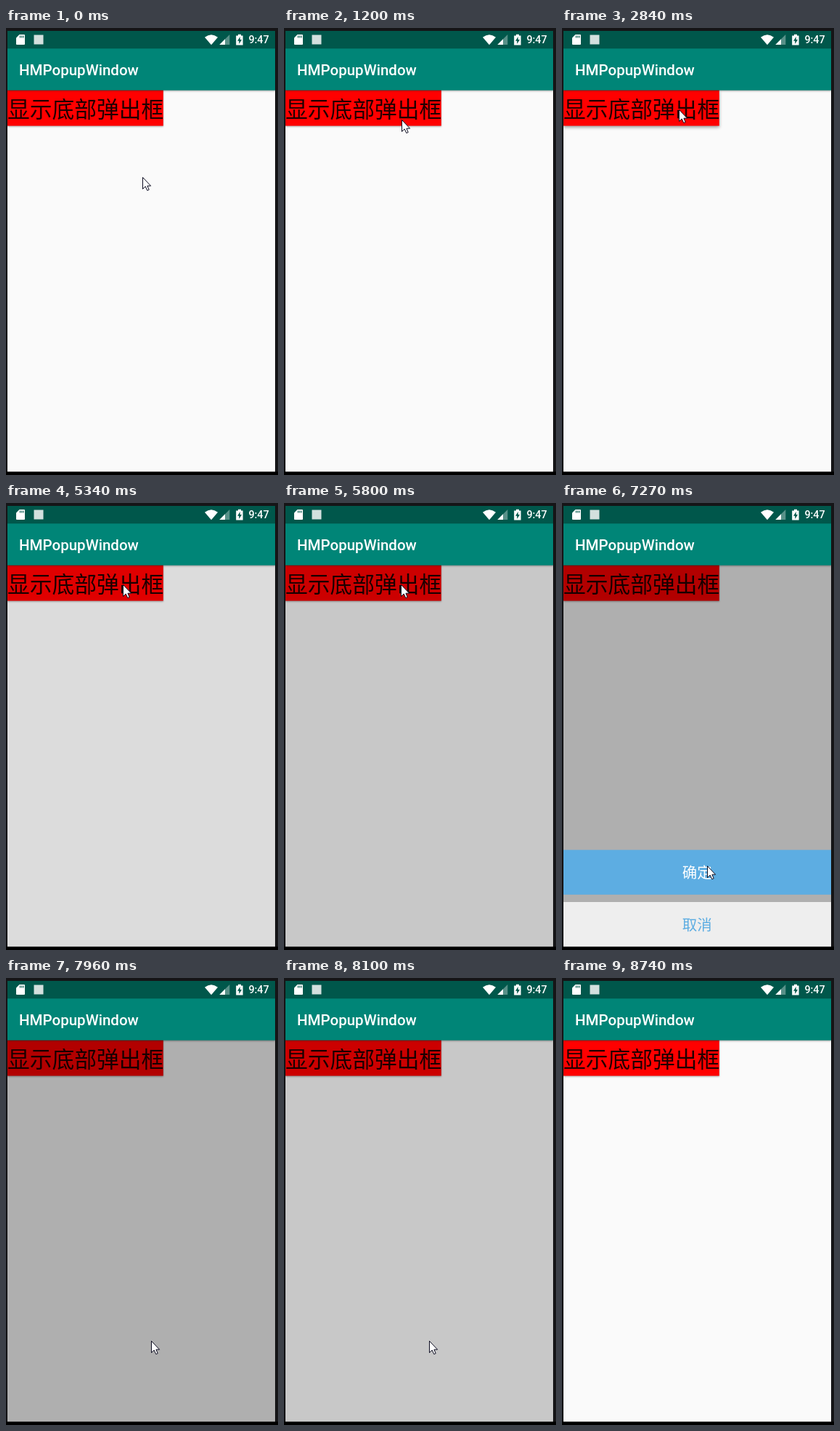
An HTML page for the animation above (9.32 s loop, 375x615 px).

```html
<!DOCTYPE html>
<html lang="zh-CN">
<head>
<meta charset="utf-8">
<title>Popup window</title>
<style>
html, body { margin: 0; width: 100%; height: 100%; overflow: hidden; background: #151517; }
svg { display: block; }
text { font-family: "Noto Sans CJK SC", "Noto Sans CJK", sans-serif; }
.ui { font-family: Roboto, sans-serif; font-weight: 500; fill: #fff; }
.bar { filter: drop-shadow(0 1px 1.2px rgba(0,0,0,.35)); }
.button { filter: drop-shadow(0 1px 1px rgba(0,0,0,.35)); }
.button.lifted { filter: drop-shadow(0 2.5px 2px rgba(0,0,0,.4)); }
.option { font-size: 20.5px; text-anchor: middle; }
</style>
</head>
<body>
<svg width="375" height="615" viewBox="0 0 375 615">
  <rect width="375" height="615" fill="#151517"/>
  <clipPath id="screen"><rect x="2" y="4" width="369" height="607"/></clipPath>
  <g clip-path="url(#screen)">
    <rect x="2" y="85" width="369" height="526" fill="#fafafa"/>
    <rect id="button" class="button" x="2" y="85" width="214.8" height="49.6" fill="#f00"/>
    <text x="2" y="122.7" font-size="30.75" fill="#000" fill-opacity=".87">显示底部弹出框</text>
    <rect id="dim" x="2" y="85" width="369" height="526"/>
    <rect class="bar" x="2" y="28" width="369" height="57.7" fill="#008577"/>
    <rect x="2" y="4" width="369" height="24.3" fill="#00574b"/>
    <g id="popup">
      <rect x="2" y="477.3" width="369" height="61.5" fill="#5dade2"/>
      <rect x="2" y="549" width="369" height="62" fill="#eee"/>
      <text class="option" x="186.3" y="516" fill="#fff">确定</text>
      <text class="option" x="186.3" y="587.7" fill="#5dade2">取消</text>
    </g>
  </g>
  <rect y="610.4" width="375" height="4.6" fill="#000"/>

  <text class="ui" x="18" y="65.3" font-size="20.5">HMPopupWindow</text>
  <text class="ui" x="334.4" y="21.3" font-size="14.35">9:47</text>
  <g fill="#fff">
    <path d="M18.5 9H25q1 0 1 1V22q0 1-1 1H15q-1 0-1-1V13.5Z"/>
    <path d="M19.5 10.5v3m2.2-3v3m2.2-3v3" stroke="#00574b" stroke-width="1.1"/>
    <rect x="38.5" y="9.5" width="13" height="13" fill="#d3e0de"/>
    <path d="M274 12.8Q283 5.8 292 12.8L283 23.3Z"/>
    <path d="M308.3 9V23H294.3Z" fill-opacity=".35"/>
    <path d="M302 15.3V23H294.3Z"/>
    <path d="M320 8.8h4v1.6h2.6V23.6h-9.4V10.4H320Z"/>
    <path d="M322.7 12v4h2.3l-3.7 6v-4.2h-2.2Z" fill="#00574b"/>
  </g>
  <path id="cursor" d="M.5 .5V16.5L4.2 13L6.8 18.6L9.2 17.5L6.9 12.2H11.6Z" fill="#fff" stroke="#0c0c20"/>
</svg>
<script>
const LOOP = 9320;
const HOME = [188, 205];
// Pointer moves: each is a curve bent towards a point, shown in a few hard steps
const moves = [
  { from: 150, to: 1440, count: 11, bend: [163, 148], end: [161, 112] },
  { from: 6560, to: 6840, count: 3, bend: [145, 160], end: [238, 445] },
  { from: 6990, to: 7270, count: 3, bend: [206, 511], end: [200, 499] },
  { from: 8220, to: 8740, count: 5, bend: [290, 545], end: [385, 635] }
];
const $ = id => document.getElementById(id);
const during = (t, from, to) => t >= from && t < to;

// Progress 0..1 in equal jumps; the first is at `from`, the last at `to`
function stepped(t, from, to, count) {
  if (t < from) return 0;
  const done = 1 + Math.floor((t - from) / (to - from) * (count - 1));
  return Math.min(done, count) / count;
}

function pointerAt(t) {
  let tip = HOME;
  for (const { from, to, count, bend, end } of moves) {
    const u = stepped(t, from, to, count), v = 1 - u;
    tip = tip.map((p, i) => v * v * p + 2 * u * v * bend[i] + u * u * end[i]);
  }
  return tip;
}

function dimAt(t) {
  const darken = stepped(t, 4450, 5950, 5) ** 1.8;
  return 0.3 * (darken - stepped(t, 8100, 8340, 3));
}

function draw() {
  const t = performance.now() % LOOP;
  $("cursor").setAttribute("transform", `translate(${pointerAt(t).map(Math.round)})`);
  $("dim").setAttribute("opacity", dimAt(t));
  $("button").classList.toggle("lifted", during(t, 2840, 3360));
  $("popup").style.display = during(t, 5950, 7960) ? "" : "none";
  requestAnimationFrame(draw);
}
draw();
</script>
</body>
</html>
```
